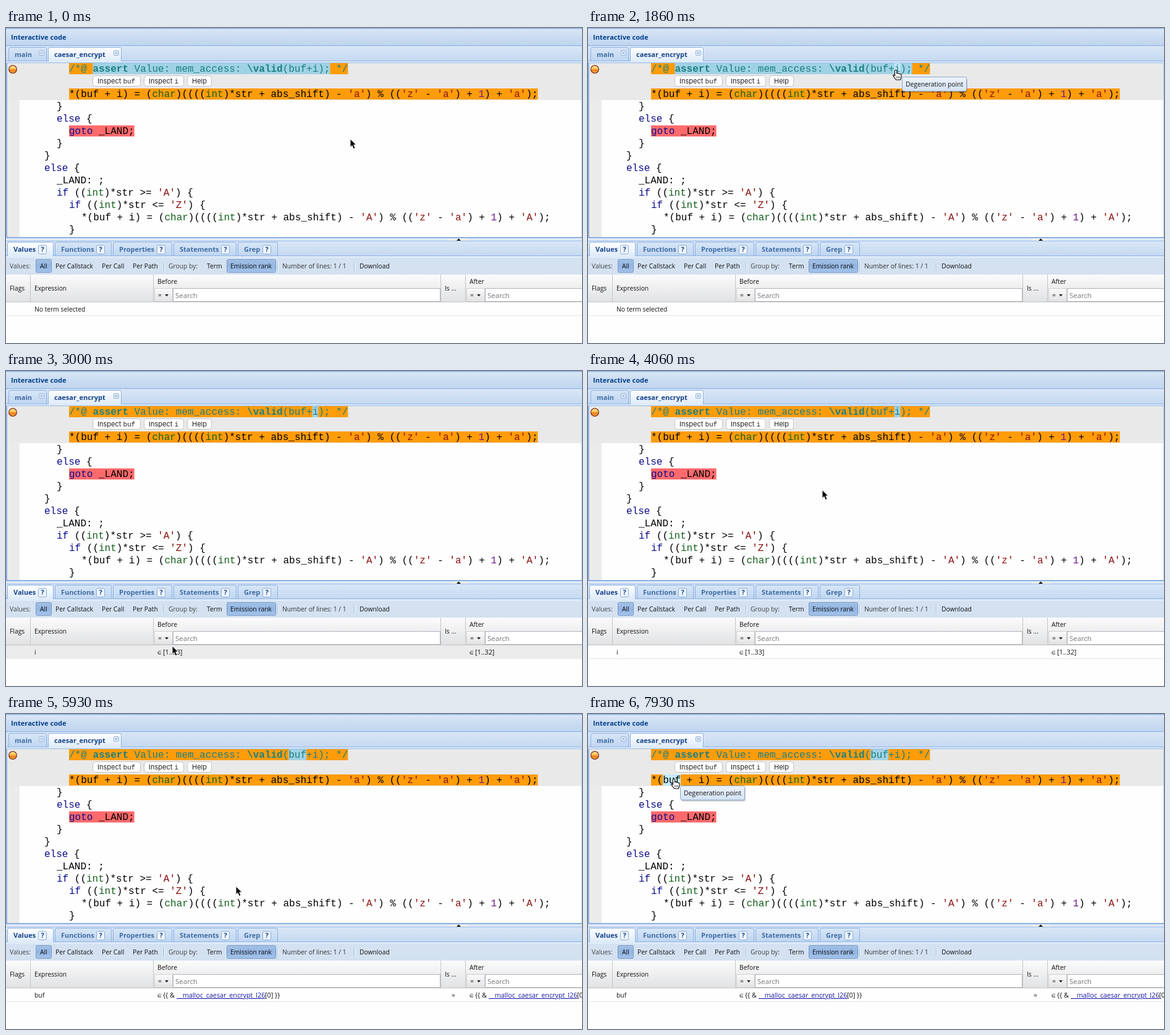
Write an HTML page that moves like this. It is 932x511 px and loops after 8 s.

```html
<!DOCTYPE html>
<html lang="en">
<head>
<meta charset="utf-8">
<title>Interactive code</title>
<style>
  html, body { margin: 0; height: 100%; overflow: hidden; background: #fff; }
  svg { display: block; width: 100%; height: 100%; }
  text { font: 10.3px "Open Sans", "Noto Sans", sans-serif; fill: #111; white-space: pre; }
  .tab { font-size: 11px; font-weight: 700; fill: #416da3; }
  .title { font-size: 11.1px; fill: #04408c; }
  .active { fill: #15428b; }
  .search { font-size: 11.4px; fill: #777; }
  .code { font: 16px "Liberation Mono", monospace; fill: #000; }
  .spec { fill: #1b7f7f; }
  .button { font: 11px Inter, sans-serif; fill: #222; }
  .mono { font-family: "Liberation Mono", monospace; }
  .member { font: 8px "DejaVu Sans", sans-serif; }
  .value { font-size: 10.8px; }
  .link { fill: #1a1aa6; text-decoration: underline; }
  .keyword { fill: #0b0b8c; }
  .type { fill: #14601e; }
  .string { fill: #8c1010; }
  .number { fill: #70188c; }
  .bold { font-weight: 700; }
</style>
</head>
<body>
<svg id="stage" viewBox="0 0 932 511" preserveAspectRatio="none">
  <defs>
    <linearGradient id="titleFill" x2="0" y2="1"><stop stop-color="#dce8f7"/><stop offset=".5" stop-color="#cadcf2"/><stop offset="1" stop-color="#c0d5ef"/></linearGradient>
    <linearGradient id="barFill" x2="0" y2="1"><stop stop-color="#d9e6f6"/><stop offset="1" stop-color="#c5d9f1"/></linearGradient>
    <linearGradient id="tabFill" x2="0" y2="1"><stop stop-color="#d8e6f7"/><stop offset="1" stop-color="#c0d6f1"/></linearGradient>
    <linearGradient id="activeFill" x2="0" y2="1"><stop stop-color="#fff"/><stop offset="1" stop-color="#deebf9"/></linearGradient>
    <linearGradient id="headFill" x2="0" y2="1"><stop stop-color="#fbfbfb"/><stop offset="1" stop-color="#e1e2e4"/></linearGradient>
    <linearGradient id="pressFill" x2="0" y2="1"><stop stop-color="#a3c1e6"/><stop offset=".5" stop-color="#92b5e2"/><stop offset="1" stop-color="#a3c3eb"/></linearGradient>
    <linearGradient id="tipFill" x2="0" y2="1"><stop stop-color="#edf3fb"/><stop offset="1" stop-color="#d3e2f4"/></linearGradient>
    <linearGradient id="ballFill" x2="0" y2="1"><stop stop-color="#ffe9a8"/><stop offset=".45" stop-color="#fcc04e"/><stop offset=".6" stop-color="#ee7a1c"/><stop offset="1" stop-color="#fbb040"/></linearGradient>
  </defs>
</svg>
<script>
const CHAR = 9.602, CODE_X = 102;
const rect = (x, y, w, h, fill, attrs = '') =>
  `<rect x="${x}" y="${y}" width="${w}" height="${h}" fill="${fill}" ${attrs}/>`;
const box = (x, y, w, h, fill, stroke, r = 0) =>
  rect(x + .5, y + .5, w - 1, h - 1, fill, `stroke="${stroke}" rx="${r}"`);
const text = (x, y, s, cls = '', attrs = '') =>
  `<text x="${x}" y="${y}" class="${cls}" ${attrs}>${s}</text>`;
const span = (cls, s) => `<tspan class="${cls}">${s}</tspan>`;
const path = (d, fill, attrs = '') => `<path d="${d}" fill="${fill}" ${attrs}/>`;
const group = (id, body) => `<g id="${id}">${body}</g>`;

const colour = s => s.replace(/('.')|\b(int|char)\b|\b(if|else|goto)\b|\b(1)\b/g,
  (m, string, type, keyword) =>
    span(string ? 'string' : type ? 'type' : keyword ? 'keyword' : 'number', m));

const tab = (x, y, w, h, label, active) =>
  path(`M${x + .5} ${y + h}v${3 - h}q0 -2.5 2.5 -2.5h${w - 6}q2.5 0 2.5 2.5v${h - 3}`,
    `url(#${active ? 'activeFill' : 'tabFill'})`, 'stroke="#8db2e3"') +
  text(x + 10, y + 16, label, 'tab' + (active ? ' active' : ''));

const closeIcon = x => box(x, 36, 9, 9, '#e8f0fa', '#8fb0da', 1) +
  path(`M${x + 2.5} 38.5l4 4m0 -4l-4 4`, 'none', 'stroke="#6a8fc0"');

const helpIcon = x => box(x, 352, 14, 15, '#eef5fd', '#88abd9', 2) +
  text(x + 7, 363, '?', 'tab active', 'text-anchor="middle"');

function codePanel() {
  const lines = [
    [82, '}'], [82, 'else {'], [102, 'goto _LAND;'], [82, '}'], [62, '}'], [62, 'else {'],
    [82, '_LAND: ;'], [82, "if ((int)*str >= 'A') {"], [102, "if ((int)*str &lt;= 'Z') {"],
    [122, "*(buf + i) = (char)((((int)*str + abs_shift) - 'A') % (('z' - 'a') + 1) + 'A');"],
    [102, '}']
  ];
  const button = (x, w, label) => box(x, 77, w, 18, '#fff', '#c3c3c3', 4) + text(x + 8, 90, label, 'button');
  return rect(0, 56, 932, 284, '#fefefe') +
    rect(2, 56, 20, 283, '#ebebeb') + rect(2, 56, 930, 61, '#e9e9e9') +
    rect(CODE_X, 57, 47 * CHAR, 18, '#ff9c0a') + rect(CODE_X, 98, 79 * CHAR, 18, '#ff9c0a') +
    rect(CODE_X, 158, 11 * CHAR, 18, '#ff6a6c') +
    rect(0, 57, 0, 18, '#9fd2e4', 'id="selection"') + rect(0, 0, 0, 18, '#c3eafa', 'id="hover"') +
    text(CODE_X, 71, `/*@ ${span('bold', 'assert')} Value: mem_access: ${span('bold', '\\valid')}(buf+i); */`, 'code spec') +
    text(CODE_X, 112, colour("*(buf + i) = (char)((((int)*str + abs_shift) - 'a') % (('z' - 'a') + 1) + 'a');"), 'code') +
    lines.map(([x, s], i) => text(x, 132 + 20 * i, colour(s), 'code')).join('') +
    button(140, 78, 'Inspect ' + span('mono', 'buf')) +
    button(223, 65, 'Inspect ' + span('mono', 'i')) + button(293, 40, 'Help') +
    '<circle cx="11" cy="67" r="6.4" fill="url(#ballFill)" stroke="#7a3320" stroke-width="1.2"/>' +
    rect(0, 0, 2, 341, '#8db2e3') + rect(931, 56, 1, 284, '#b4cdec') + rect(0, 339, 932, 2, '#8db2e3');
}

function topBars() {
  return rect(0, 0, 932, 29, 'url(#titleFill)') + rect(0, 0, 932, 1.5, '#8db2e3') +
    rect(0, 28, 932, 1.5, '#8db2e3') + text(8, 19, 'Interactive code', 'tab title') +
    rect(0, 29.5, 932, 24.5, 'url(#barFill)') + rect(0, 53, 932, 1, '#8db2e3') +
    rect(0, 54, 932, 2, '#deebf9') + rect(0, 56, 932, 1, '#99bce8') +
    tab(4, 31, 62, 22, 'main') + tab(68, 31, 119, 23, 'caesar_encrypt', true) +
    closeIcon(53) + closeIcon(174);
}

function lowerBars() {
  const tabs = [[2, 75, 'Values', 52], [79, 92, 'Functions', 146], [173, 96, 'Properties', 244],
    [271, 102, 'Statements', 348], [375, 65, 'Grep', 415]];
  const labels = [[6, 'Values:', '#444'], [55, 'All'], [80, 'Per Callstack'], [155, 'Per Call'],
    [205, 'Per Path'], [263, 'Group by:', '#444'], [325, 'Term'], [363, 'Emission rank'],
    [447, 'Number of lines: 1 / 1', '#333'], [572, 'Download']];
  return rect(0, 341, 932, 5, '#dfe8f6') + path('M716 346l3 -4h27l3 4z', '#f0efe6') +
    path('M729 345l3.5 -3.5l3.5 3.5z', '#111') +
    rect(0, 346, 932, 24, 'url(#barFill)') + rect(0, 345, 932, 1, '#99bce8') +
    rect(0, 369, 932, 1, '#8db2e3') +
    tabs.map(([x, w, label, help], i) => tab(x, 347, w, i ? 22 : 23, label, !i) + helpIcon(help)).join('') +
    rect(0, 370, 932, 30, '#d3e1f1') + rect(0, 370, 932, 3, '#deebf9') +
    box(48, 375, 26, 22, 'url(#pressFill)', '#7a9ac4', 2) +
    box(357, 375, 80, 22, 'url(#pressFill)', '#7a9ac4', 2) +
    [255, 439, 563].map(x => rect(x, 380, 1, 13, '#98b8df') + rect(x + 1, 380, 1, 13, '#fff')).join('') +
    labels.map(([x, s, fill = '#111']) => text(x, 390, s, '', `style="fill:${fill}"`)).join('');
}

function table() {
  const filter = (x, w) => box(x, 422, 30, 22, 'url(#headFill)', '#d0d0d0') +
    text(x + 6, 437, '=') + path(`M${x + 17} 432h6l-3 3.5z`, '#222') +
    box(x + 30, 422, w, 22, '#fff', '#b0b3bd') + text(x + 34, 438, 'Search', 'search');
  const member = (x, s) => text(x, 460, '∈', 'member') + text(x + 9, 460, s, 'value');
  const pointer = x => member(x, '{{ &amp;') + text(x + 31, 460, '__malloc_caesar_encrypt_l26', 'value link') +
    text(x + 174, 460, '[0] }}', 'value');
  return rect(0, 400, 932, 44, 'url(#headFill)') + rect(0, 444, 932, 1, '#c5c5c5') +
    [39, 238, 703, 743].map(x => rect(x, 400, 1, 44, '#c5c5c5')).join('') +
    text(6, 426, 'Flags') + text(46, 426, 'Expression') + text(245, 415, 'Before') +
    text(710, 426, 'Is ...') + text(750, 415, 'After') + filter(240, 433) + filter(745, 160) +
    rect(0, 445, 932, 66, '#fefefe') + rect(0, 445, 932, 22, '#ececec', 'id="rowHover"') +
    rect(0, 466, 932, 1, '#e6e6e6') +
    group('rowEmpty', text(46, 460, 'No term selected')) +
    group('rowI', text(46, 460, 'i') + member(245, '[1..33]') + member(750, '[1..32]')) +
    group('rowBuf', text(46, 460, 'buf') + pointer(245) + text(721, 460, '=') + pointer(750)) +
    rect(0, 445, 932, 66, '#e1e1e2', 'id="mask"');
}

function pointers() {
  const cross = 'M-6 0H6M0 -6V6M-4 -2l-2 2l2 2M4 -2l2 2l-2 2M-2 -4l2 -2l2 2M-2 4l2 2l2 -2';
  const beam = 'M-3 -7q3 0 3 2v10q0 2 -3 2M3 -7q-3 0 -3 2v10q0 2 3 2';
  const outlined = d => path(d, 'none', 'stroke="#fff" stroke-width="3.4"') + path(d, 'none', 'stroke="#000" stroke-width="1.5"');
  return group('tip', rect(2, 3, 104, 23, '#000', 'opacity=".18" rx="3"') +
      box(0, 0, 105, 24, 'url(#tipFill)', '#8aa9d0', 3) + text(6, 16, 'Degeneration point')) +
    group('pointer',
      group('arrow', path('M0 0V13.5L3 10.7L5.3 16L8 14.8L5.7 9.7H9.8Z', '#000', 'stroke="#fff"')) +
      group('hand', path('M-1.5 1.5Q-1.5 0 0 0T1.6 1.5V5.5Q3.5 4.5 4.3 6Q6 5.3 6.8 6.8Q9 6.3 9 8.5V11.5L7.5 16H0.5L-4 10Q-5 8 -3.3 8L-1.5 9.5Z',
        '#fff', 'stroke="#000" stroke-width="1.1"') + path('M1.8 10.5v3M4 10.5v3M6.2 10.5v3', 'none', 'stroke="#000" stroke-width=".8"')) +
      group('beam', outlined(beam)) + group('cross', outlined(cross)));
}

const stage = document.getElementById('stage');
stage.insertAdjacentHTML('beforeend', codePanel() + topBars() + lowerBars() + table() + pointers());

const el = id => document.getElementById(id);
const show = (id, on) => el(id).setAttribute('visibility', on ? 'inherit' : 'hidden');
const place = (id, attrs) => { for (const k in attrs) el(id).setAttribute(k, attrs[k]); };
const move = (id, x, y) => place(id, { transform: `translate(${x.toFixed(1)} ${y.toFixed(1)})` });

const token = (from, to, y) => ({ x: CODE_X + from * CHAR, width: (to - from) * CHAR, y });
const assertion = token(4, 44, 57), indexToken = token(41, 42, 57);
const bufToken = token(37, 40, 57), lowerBuf = token(2, 5, 98);
const CLICK_I = 1930, CLICK_BUF = 5260, LOADING = 400, LOOP = 8000;

// time, x, y of the pointer
const route = [[0, 557, 180], [300, 557, 180], [1450, 498, 68], [2100, 498, 68], [2750, 264, 456],
  [3000, 269, 446], [4060, 379, 193], [5000, 462, 59], [5450, 462, 59], [6350, 300, 456],
  [6600, 302, 454], [6800, 307, 443], [7550, 139, 105], [LOOP, 139, 105]];

function pointerAt(t) {
  const i = Math.max(1, route.findIndex(k => k[0] > t));
  const [t0, x0, y0] = route[i - 1], [t1, x1, y1] = route[i];
  const u = (t - t0) / (t1 - t0), e = u * u * (3 - 2 * u);
  return [x0 + (x1 - x0) * e, y0 + (y1 - y0) * e];
}

function draw(now) {
  const t = Math.floor((now % LOOP + 6.7) * .015) / .015 % LOOP;
  const [x, y] = pointerAt(t);
  const within = k => x >= k.x && x <= k.x + k.width && y >= k.y && y <= k.y + 18;
  const over = [indexToken, bufToken, lowerBuf].find(within);
  const selected = t < CLICK_I ? assertion : t < CLICK_BUF ? indexToken : bufToken;
  const loading = [CLICK_I, CLICK_BUF].some(c => t >= c && t < c + LOADING);

  place('selection', selected);
  show('hover', over && over !== selected);
  if (over) place('hover', over);
  show('rowEmpty', selected === assertion);
  show('rowI', selected === indexToken);
  show('rowBuf', selected === bufToken);
  show('rowHover', y >= 442.9);
  show('mask', loading);

  const kind = over ? (y < 62 ? 'beam' : 'hand') : Math.abs(y - 443) < 1.5 ? 'cross' : 'arrow';
  for (const k of ['arrow', 'hand', 'beam', 'cross']) show(k, k === kind);
  move('pointer', x, y);
  show('tip', over);
  move('tip', x + 10, y + 11);
}

const start = performance.now();
(function frame() {
  draw(performance.now() - start);
  requestAnimationFrame(frame);
})();
</script>
</body>
</html>
```
